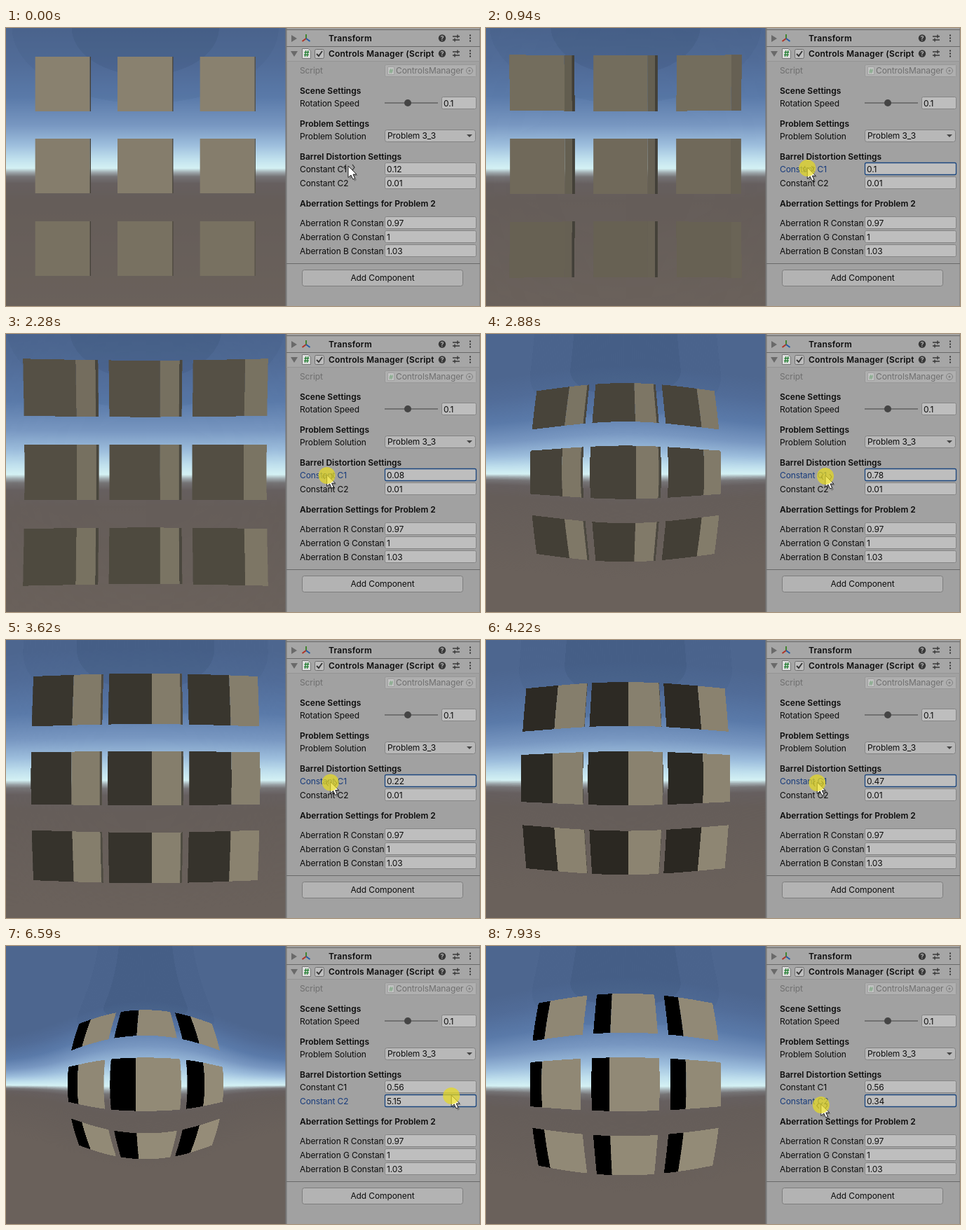
Animation, 676 px wide and 397 px high, one loop 8000 ms. Source, as an HTML page with a canvas:

```html
<!DOCTYPE html>
<html lang="en">
<head>
<meta charset="utf-8">
<title>Barrel distortion controls</title>
<style>
  html, body { margin: 0; width: 100%; height: 100%; overflow: hidden; background: #a1a1a1; }
  canvas, svg { position: absolute; left: 0; top: 0; display: block; }
  text { font: 12px Inter, sans-serif; letter-spacing: -.1px; fill: #0c0c0c; white-space: pre; }
  .bold { font-weight: 600; letter-spacing: 0; }
  .title { letter-spacing: .2px; }
  .dim { fill: #6f6f6f; }
  .field rect { fill: #bebebe; stroke: #858585; }
  .focus .label { fill: #173b7c; }
  .focus .field rect { stroke: #1c477f; stroke-width: 1.3; }
</style>
</head>
<body>
<canvas id="view" width="399" height="397"></canvas>
<svg id="panel" width="676" height="397" viewBox="0 0 676 397">
  <defs>
    <clipPath id="labels"><path d="M400 0H539V397H400z"/></clipPath>
    <g id="tools" fill="none" stroke="#383838" stroke-width="1.4">
      <circle cx="622" r="5.2" fill="#383838" stroke="none"/>
      <text x="622" y="3.4" text-anchor="middle" style="font-size:9px;font-weight:700;fill:#b4b4b4" stroke="none">?</text>
      <path d="M637 -2.5H647M637 2.5H647M644 -5V0M640 0V5"/>
      <path d="M662 -5v2M662 -1v2M662 3v2" stroke-width="2"/>
    </g>
  </defs>
  <path d="M399 0H676V397H399z" fill="#a1a1a1"/>
  <path d="M400 3H676V47H400z" fill="#a6a6a6"/>
  <path d="M399.5 0V397" stroke="#777" stroke-width="2"/>
  <path d="M675.5 0V397" stroke="#8b8b8b"/>
  <path d="M400 2.5H676M400 26.5H676M400 336.5H676" stroke="#696969"/>
  <path d="M400 47.5H676" stroke="#949494"/>

  <path d="M407 10L415 15L407 20z" fill="#6a6a6a"/>
  <path d="M406 33H416L411 41z" fill="#6a6a6a"/>
  <g stroke-width="2" fill="none">
    <path d="M428 15V9" stroke="#41852f"/><path d="M428 15L422.500 19" stroke="#b03426"/>
    <path d="M428 15L433.500 19" stroke="#245ca6"/>
  </g>
  <path d="M422.500 29.500H431L434.500 33V43.500H422.500z" fill="#dedede" stroke="#777"/>
  <text x="428.500" y="41" text-anchor="middle" style="font-weight:700;fill:#278036">#</text>
  <rect x="440.500" y="30.500" width="13" height="13" rx="2" fill="#bebebe" stroke="#6f6f6f"/>
  <path d="M443 37L446 40L451 33" fill="none" stroke="#333" stroke-width="1.8"/>
  <use href="#tools" y="14.500"/><use href="#tools" y="36.500"/>
  <text class="bold title" x="460" y="19">Transform</text>
  <text class="bold title" x="460" y="41">Controls Manager (Script</text>

  <text class="dim" x="419" y="65">Script</text>
  <rect x="540.500" y="52.500" width="130" height="17" rx="2" fill="#afafaf" stroke="#979797"/>
  <path d="M544.500 55.500H553.500V66.500H544.500z" fill="#c5c5c5" stroke="#a0a0a0"/>
  <text x="549" y="65" text-anchor="middle" style="font-size:9px;font-weight:700;fill:#7ea684">#</text>
  <text class="dim" x="556" y="65">ControlsManager</text>
  <path d="M654 53H670V69H654z" fill="#afafaf"/>
  <circle cx="661" cy="61" r="4.500" fill="none" stroke="#818181"/><circle cx="661" cy="61" r="1.500" fill="#818181"/>

  <text class="bold" x="419" y="94">Scene Settings</text>
  <text x="419" y="112">Rotation Speed</text>
  <path d="M540 107H616" stroke="#626262" stroke-width="1.600"/>
  <circle cx="573" cy="107" r="5" fill="#454545"/>
  <g class="field"><rect x="621.500" y="98.500" width="49" height="17" rx="2"/><text x="624" y="112">0.1</text></g>

  <text class="bold" x="419" y="141">Problem Settings</text>
  <text x="419" y="159">Problem Solution</text>
  <rect x="540.500" y="145.500" width="129" height="17" rx="3" fill="#b8b8b8" stroke="#828282"/>
  <text x="544" y="158">Problem 3_3</text>
  <path d="M657 152H665L661 156z" fill="#444"/>

  <text class="bold" x="419" y="188">Barrel Distortion Settings</text>
  <text class="bold" x="419" y="255">Aberration Settings for Problem 2</text>
  <g id="rows"></g>

  <rect x="422.500" y="345.500" width="229" height="23" rx="3" fill="#b3b3b3" stroke="#7d7d7d"/>
  <text x="537" y="361" text-anchor="middle">Add Component</text>

  <g id="cursor">
    <path id="resize" d="M-3 -3L-6 1L-3 5M6 -3L9 1L6 5" fill="none" stroke="#333" stroke-width="1.200"/>
    <path d="M2 2V18L6 15L9 21L12 19L9 13H14z" fill="#000" opacity=".22"/>
    <path d="M0 -1V15.500L4 12L6.800 18L9.600 16.700L7 11H12z" fill="#fff" stroke="#222"/>
    <circle id="press" r="12" fill="#e6d921" opacity=".72"/>
  </g>
</svg>
<script>
const $ = id => document.getElementById(id);
const LOOP = 8000, STEP = 102.75;
const W = 399, H = 397, CX = 199, CY = 198, RADIUS = 199;
const BASE = [0.12, 0.01];

// Piecewise linear track of [time, value] pairs.
function track(keys, t) {
  const i = keys.findIndex(k => k[0] > t);
  if (i === 0) return keys[0][1];
  if (i < 0) return keys[keys.length - 1][1];
  const [t0, a] = keys[i - 1], [t1, b] = keys[i];
  return a + (b - a) * (t - t0) / (t1 - t0);
}

const C1 = [[880, .12], [1250, 0], [1660, -.06], [1960, -.04], [2380, .12], [2580, .33],
  [2880, .78], [3060, .78], [3300, .5], [3700, .14], [3850, .15], [4120, .38],
  [4230, .47], [4520, .63], [4860, .56]];
const C2 = [[5580, .01], [5880, 1.75], [6300, 4.6], [6590, 5.15], [6690, 5.24],
  [6950, 5], [7430, 2.95], [7925, .34]];
const POINTER_Y = [[0, 198], [840, 200], [2880, 203], [4220, 204], [5000, 205], [5300, 221],
  [5700, 221], [6590, 214], [7000, 216], [7930, 227]];

function pointerX(t, c1, c2) {
  if (t < 800) return track([[0, 488], [150, 488], [700, 459]], t);
  if (t < 5000) return 454.5 + 37.8 * c1;
  if (t < 5400) return track([[5000, 475.7], [5300, 467]], t);
  return 467 + (c2 - .01) * 32.7;
}

// Inspector rows
const rows = [["Constant C1", 202, "0.12"], ["Constant C2", 222, "0.01"],
  ["Aberration R Constant", 279, "0.97"], ["Aberration G Constant", 299, "1"],
  ["Aberration B Constant", 319, "1.03"]];
$("rows").innerHTML = rows.map(([label, y, value], i) => `
  <g id="row${i}">
    <text class="label" x="419" y="${y + 4}" clip-path="url(#labels)">${label}</text>
    <g class="field"><rect x="540.5" y="${y - 9.5}" width="130" height="17" rx="2"/>
    <text id="value${i}" x="543" y="${y + 4}">${value}</text></g>
  </g>`).join("");

// Undistorted scene, drawn at double size
const scene = document.createElement("canvas");
scene.width = W * 2;
scene.height = H * 2;
const sc = scene.getContext("2d", { willReadFrequently: true });
sc.scale(2, 2);

const sky = sc.createLinearGradient(0, 0, 0, H);
[[0, "#4d668f"], [.12, "#516c98"], [.25, "#5a7aa9"], [.35, "#7897c1"], [.42, "#9cbddc"],
 [.47, "#bfdfed"], [.505, "#d4f1f4"], [.52, "#9ea8ac"], [.535, "#757375"],
 [.56, "#665f5f"], [.62, "#655d59"], [1, "#6a615b"]].forEach(s => sky.addColorStop(...s));

function fill(color, ...points) {
  sc.fillStyle = color;
  sc.beginPath();
  points.forEach(p => sc.lineTo(...p));
  sc.fill();
}

const stone = light => `rgb(${light},${light * .945},${light * .81})`;

function drawCube(col, row, angle) {
  const rad = angle * Math.PI / 180, side = 78;
  const front = side * Math.cos(rad), flank = side * Math.sin(rad);
  const x = CX + (col - 1) * 117.5 - (front + flank) / 2;
  const y = CY - .5 + (row - 1) * 117.5 - side / 2;
  const quad = (a, b, color) => fill(color, [a, y], [b, y], [b, y + side], [a, y + side]);
  const frontTone = [1.03, 1, .9 + angle * .002][row];
  const flankTone = .99 + .02 * (col + row - 1) * Math.cos(rad);
  const split = x + front, end = split + flank;
  quad(x, split, stone(Math.max(0, 135 - 2.25 * angle) * frontTone));
  quad(split, end, stone(146 * Math.cos(.85 * (rad - 1.13)) * flankTone));
  // Shadow thrown by the neighbour on the right
  const shade = Math.max(0, Math.min(1, 3 / (angle + 1), (42 - angle) / 100));
  if (col < 2) quad(end - flank * shade, end, "rgba(50,48,44,.65)");
}

function drawScene(angle) {
  sc.fillStyle = sky;
  sc.fillRect(0, 0, W, H);
  for (const [rx, ry, alpha] of [[190, 108, .05], [105, 68, .1]]) {
    sc.fillStyle = `rgba(30,48,85,${alpha})`;
    sc.beginPath();
    sc.ellipse(CX, 0, rx, ry, 0, 0, Math.PI * 2);
    sc.fill();
  }
  for (let i = 0; i < 9; i++) drawCube(i % 3, Math.floor(i / 3), angle);
}

const poly = (r, a, b) => r * (1 + a * r * r + b * r ** 4);

// Scale from screen radius to scene radius, indexed by squared radius.
const CELL = 16, scales = new Float32Array(Math.ceil(80000 / CELL) + 1);
function buildScales(c1, c2) {
  const [a, b] = BASE;
  for (let i = 0; i < scales.length; i++) {
    const r = Math.sqrt((i + .5) * CELL) / RADIUS, goal = poly(r, c1, c2);
    let s = goal;
    for (let n = 0; n < 10; n++)
      s -= (poly(s, a, b) - goal) / (1 + 3 * a * s * s + 5 * b * s ** 4);
    scales[i] = s / r;
  }
}

const view = $("view").getContext("2d");
const image = view.createImageData(W, H);
const out = new Uint32Array(image.data.buffer);
const clamp = (v, max) => v < 0 ? 0 : v > max ? max : v;

function drawView(angle, c1, c2) {
  drawScene(angle);
  buildScales(c1, c2);
  const src = new Uint32Array(sc.getImageData(0, 0, W * 2, H * 2).data.buffer);
  for (let y = 0, i = 0; y < H; y++) {
    const dy = y + .5 - CY;
    for (let x = 0; x < W; x++, i++) {
      const dx = x + .5 - CX;
      const k = scales[Math.floor((dx * dx + dy * dy) / CELL)] * 2;
      const sx = clamp(CX * 2 + dx * k, W * 2 - 1) | 0;
      const sy = clamp(CY * 2 + dy * k, H * 2 - 1) | 0;
      out[i] = src[sy * W * 2 + sx];
    }
  }
  view.putImageData(image, 0, 0);
}

function drawPanel(t, c1, c2) {
  const x = pointerX(t, c1, c2), y = track(POINTER_Y, t);
  $("value0").textContent = String(+c1.toFixed(2));
  $("value1").textContent = String(+c2.toFixed(2));
  $("row0").classList.toggle("focus", t >= 740 && t < 5350);
  $("row1").classList.toggle("focus", t >= 5350);
  $("cursor").setAttribute("transform", `translate(${x.toFixed(1)} ${y.toFixed(1)})`);
  $("press").style.display = (t >= 740 && t < 4960) || t >= 5350 ? "" : "none";
  $("resize").style.display = x < 530 ? "" : "none";
}

let shown = -1;
function tick(now) {
  const step = Math.floor(now % LOOP / STEP);
  if (step !== shown) {
    shown = step;
    const t = step ? 17 + step * STEP : 0, s = t / 1000;
    const c1 = track(C1, t), c2 = track(C2, t);
    drawView(1 + 10.2 * s - .19 * s * s, c1, c2);
    drawPanel(t, c1, c2);
  }
  requestAnimationFrame(tick);
}
tick(performance.now());
</script>
</body>
</html>
```
